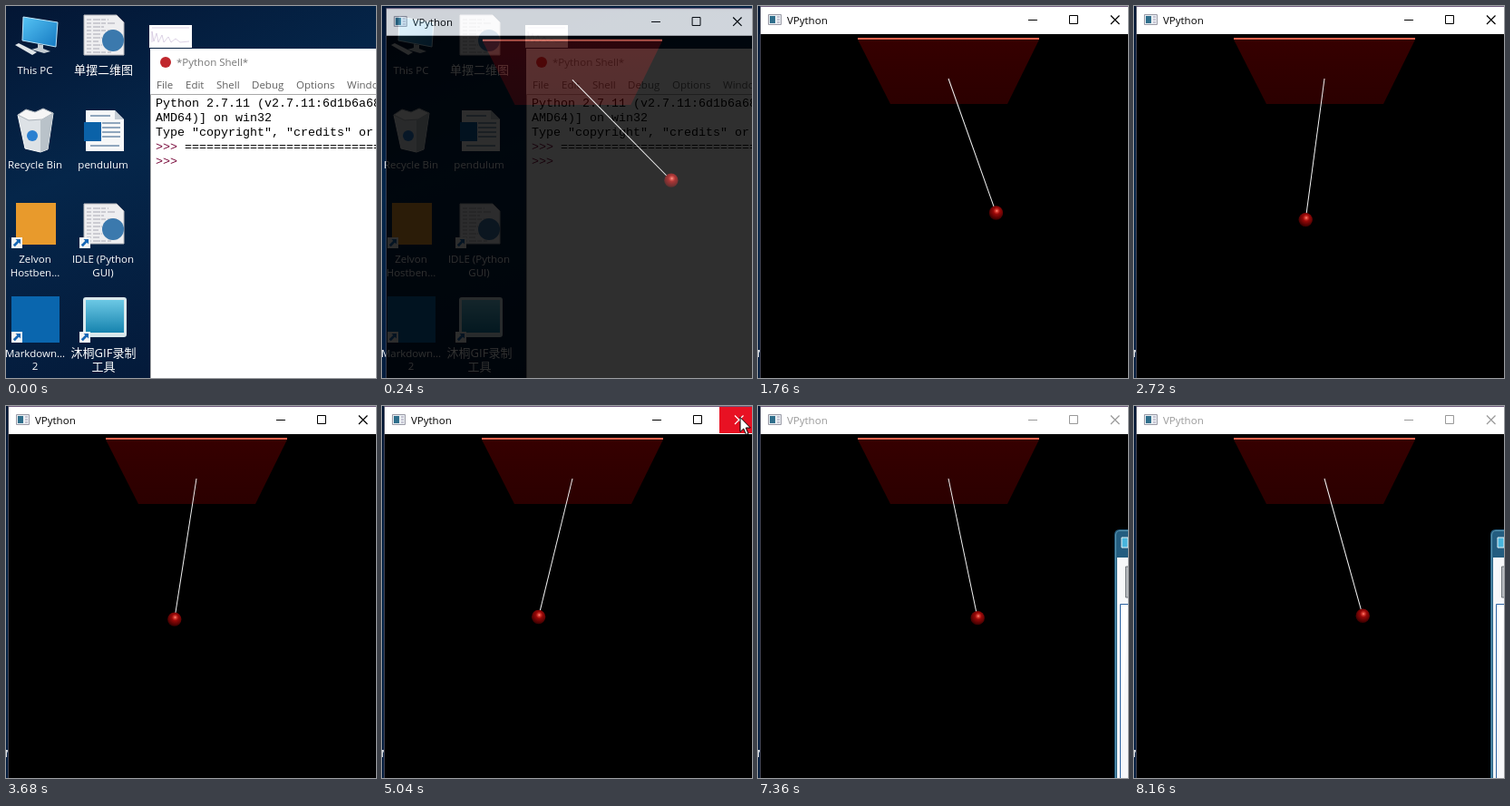
An HTML page for the animation above (8.32 s loop, 408 px wide and 410 px high).

```html
<!DOCTYPE html>
<html lang="en">
<head>
<meta charset="utf-8">
<title>Pendulum</title>
<style>
  html, body { margin: 0; width: 100%; height: 100%; overflow: hidden; background: #000; }
  svg { display: block; width: 100vw; height: 100vh; }
  text { font: 11.5px "Open Sans", "Noto Sans CJK SC", "Noto Sans CJK", sans-serif; white-space: pre; }
  .label { fill: #fff; text-anchor: middle; }
  .cjk { font-size: 13px; }
  .mono { font: 13.33px "Liberation Mono", monospace; }
  .menu { fill: #606060; }
</style>
</head>
<body>
<svg viewBox="0 0 408 410" preserveAspectRatio="none">
  <defs>
    <linearGradient id="wallpaper" x2="0.4" y2="1">
      <stop offset="0" stop-color="#031634"/>
      <stop offset=".45" stop-color="#05264a"/>
      <stop offset="1" stop-color="#041a3a"/>
    </linearGradient>
    <linearGradient id="screen" x2="1" y2="1">
      <stop offset="0" stop-color="#56c4f5"/>
      <stop offset="1" stop-color="#1478c0"/>
    </linearGradient>
    <linearGradient id="teal" x2="0" y2="1">
      <stop offset="0" stop-color="#6cc8e4"/>
      <stop offset="1" stop-color="#1683ae"/>
    </linearGradient>
    <linearGradient id="plate" x2="0" y2="1">
      <stop offset="0" stop-color="#360000"/>
      <stop offset="1" stop-color="#2b0000"/>
    </linearGradient>
    <radialGradient id="ball" cx=".55" cy=".36" r=".62">
      <stop offset="0" stop-color="#ff8c80"/>
      <stop offset=".16" stop-color="#d83a30"/>
      <stop offset=".38" stop-color="#980808"/>
      <stop offset="1" stop-color="#3c0000"/>
    </radialGradient>
    <g id="script">
      <path d="M0 0H36L44 8V44H0Z" fill="#eeeef0" stroke="#b8b8bc"/>
      <path d="M3 5H27M3 9H34M3 13H22M3 17H36M3 21H18M3 25H20M3 29H16M3 33H20M3 37H17M3 41H30"
            stroke="#a9a9b4" stroke-dasharray="5 2 8 1"/>
      <circle cx="32" cy="28" r="12" fill="#3b79ad"/>
    </g>
    <g id="shortcut">
      <path d="M0 0H12V12H0Z" fill="#f4f4f4"/>
      <path d="M4.500 2H10V7.500L8.200 5.700 3.800 10.200 1.800 8.200 6.300 3.800Z" fill="#1766b5"/>
    </g>
  </defs>

  <g id="desktop">
    <path d="M0 0H408V410H0Z" fill="url(#wallpaper)"/>

    <path d="M19 12 57 18 55 45 18 38Z" fill="url(#screen)" stroke="#bfe4f7"/>
    <path d="M35 42 41 43 41 47 49 50 42 52 28 48 35 46Z" fill="#c4ccd2"/>
    <path d="M10 43 14 41 34 51 29 54Z" fill="#dfe5e8"/>
    <use href="#script" x="86" y="10"/>

    <path d="M13 120 52 118 46 158 38 161 21 157Z" fill="#dde2e6" stroke="#f7f9fa"/>
    <path d="M13 120 22 114 32 117 41 113 52 118 40 125 25 126Z" fill="#f6f6f6" stroke="#aab2b9"/>
    <path d="M38 126 52 118 46 158 38 161Z" fill="#b9c2c9"/>
    <circle cx="29" cy="143" r="6" fill="#2a7fd0"/>
    <path d="M88 115H120L130 125V160H88Z" fill="#f6f7f8"/>
    <path d="M120 115V125H130Z" fill="#c4ccd4"/>
    <path d="M93 121H115M106 129H126M106 134H126M106 139H126M106 144H126M93 154H125"
          stroke="#8fa6bd" stroke-width="2"/>
    <path d="M86 128H105V149H86Z" fill="#0b62a8"/>

    <path d="M11 217H55V263H11Z" fill="#e89a2c"/>
    <use href="#script" x="86" y="218"/>
    <path d="M6 320H59V371H6Z" fill="#0a66ae"/>
    <rect x="85" y="321" width="48" height="44" rx="3" fill="#d9e8ec"/>
    <path d="M88 324H130V360H88Z" fill="url(#teal)"/>

    <use href="#shortcut" x="6" y="255"/>
    <use href="#shortcut" x="81" y="255"/>
    <use href="#shortcut" x="6" y="359"/>
    <use href="#shortcut" x="81" y="359"/>

    <g class="label">
      <text x="32" y="75">This PC</text>
      <text class="cjk" x="107.500" y="75">单摆二维图</text>
      <text x="32" y="179">Recycle Bin</text>
      <text x="107" y="179">pendulum</text>
      <text x="32" y="283">Zelvon</text>
      <text x="32" y="298">Hostben...</text>
      <text x="107" y="283">IDLE (Python</text>
      <text x="107" y="298">GUI)</text>
      <text x="32" y="387">Markdown...</text>
      <text x="32" y="401">2</text>
      <text class="cjk" x="107.500" y="387">沐桐GIF录制</text>
      <text class="cjk" x="107.500" y="402">工具</text>
    </g>

    <path d="M158 21H205V46H158Z" fill="#fff"/>
    <path d="M161 40V28L163 39 166 30 168 40 172 32 174 40 179 34 182 40 187 36 192 40 202 39M161 24H202"
          fill="none" stroke="#cdbfda" stroke-width=".7"/>

    <path d="M159 47H408V410H159Z" fill="#fff"/>
    <path d="M159.500 410V97.500H408" fill="none" stroke="#a8a8a8"/>
    <circle cx="176" cy="62" r="6" fill="#c0272d"/>
    <text x="188" y="66" fill="#777">*Python Shell*</text>
    <g class="menu">
      <text x="166" y="91">File</text>
      <text x="198" y="91">Edit</text>
      <text x="232" y="91">Shell</text>
      <text x="271" y="91">Debug</text>
      <text x="320" y="91">Options</text>
      <text x="376" y="91">Windows</text>
    </g>
    <text class="mono" x="165" y="111">Python 2.7.11 (v2.7.11:6d1b6a68f775</text>
    <text class="mono" x="165" y="127">AMD64)] on win32</text>
    <text class="mono" x="165" y="143">Type "copyright", "credits" or</text>
    <text class="mono" x="165" y="159" fill="#7a0c3c">&gt;&gt;&gt;</text>
    <text class="mono" x="197" y="159">==============================</text>
    <text class="mono" x="165" y="175" fill="#7a0c3c">&gt;&gt;&gt;</text>
  </g>

  <g id="window">
    <path d="M3 0H414V416H3Z"/>
    <path d="M2.500 0V416" stroke="#44485a"/>
    <path d="M3 0H414V31H3Z" fill="#fff"/>
    <path d="M3 .5H414" stroke="#6d5a7c"/>
    <path d="M11.500 9.500H25.500V20.500H11.500Z" fill="#e9eef2" stroke="#9a9aa6"/>
    <path d="M13 11H19V19H13Z" fill="#2f6f8c"/>
    <path d="M21 12H24M21 15H24M21 18H24" stroke="#a59bb4"/>
    <text id="caption" x="32" y="20">VPython</text>
    <path id="hover" d="M372 1H414V30H372Z" fill="#e81123"/>
    <g id="buttons" fill="none">
      <path d="M298 15.500H308M343.500 10.500H352.500V19.500H343.500Z"/>
      <path id="cross" d="M389 10.500 398.500 20M398.500 10.500 389 20" stroke-width="1.200"/>
    </g>
    <path d="M110 37H310L275 108H146Z" fill="url(#plate)"/>
    <path d="M110 36H310" stroke="#e0604c" stroke-width="2"/>
    <path id="rod" d="M210 80V230" stroke="#f4f4f4"/>
    <circle id="bob" r="7.700" fill="url(#ball)"/>
  </g>

  <g id="recorder">
    <path d="M393 410V142Q393 136 399 136H408V410Z" fill="#245d80"/>
    <path d="M394.500 410V142Q395 137.500 399 137.500H408" fill="none" stroke="#5792ad"/>
    <path d="M396 167H408V410H396Z" fill="#f7f8fa"/>
    <path d="M401 145H408V156H401Z" fill="#48b4dc" stroke="#e8f4f8"/>
    <path d="M408 177H405.500V211H408" fill="#b8bcc0" stroke="#70767c"/>
    <path d="M408 218.500H399.500V410" fill="#fff" stroke="#2d62a0"/>
  </g>

  <path id="cursor" d="M0 0V16L3.700 12.500 6.500 19 9 18 6.200 11.500H11.300Z" fill="#fff" stroke="#000"/>
</svg>

<script>
const LOOP = 8320, STEP = 80;
const HOLDS = [1920, 2240, 2800, 3200, 4400, 5120, 5520, 8000, 8240];
// time in ms, swing phase in degrees
const PHASES = [[240, 0], [1760, 2857.5], [3680, 6005], [5040, 8509], [6560, 11071], [8160, 14082]];
const PIVOT = { x: 210, y: 80 }, LENGTH = 157;

const $ = id => document.getElementById(id);
const set = (id, attrs) => {
  for (const name in attrs) $(id).setAttribute(name, attrs[name]);
};
const ramp = (t, from, to) => Math.min(1, Math.max(0, (t - from) / (to - from)));
const tick = t => t / STEP - HOLDS.filter(hold => hold <= t).length;

function phase(t) {
  let i = 0;
  while (i < PHASES.length - 2 && t > PHASES[i + 1][0]) i++;
  const [t0, p0] = PHASES[i], [t1, p1] = PHASES[i + 1];
  return p0 + (p1 - p0) * ramp(tick(t), tick(t0), tick(t1));
}

function swing(t) {
  const amplitude = 21 + 23.5 * Math.exp(-Math.max(0, t - 240) / 300);
  return amplitude * Math.cos(phase(t) * Math.PI / 180);
}

function draw(t) {
  const scale = 0.99 + 0.01 * ramp(t, 240, 400);
  set('window', {
    opacity: ramp(t, 0, 240) * 0.81 + ramp(t, 240, 400) * 0.19,
    transform: `translate(205 215) scale(${scale}) translate(-205 -215)`
  });

  const angle = swing(t), rad = angle * Math.PI / 180;
  set('rod', { transform: `rotate(${-angle} ${PIVOT.x} ${PIVOT.y})` });
  set('bob', { cx: PIVOT.x + LENGTH * Math.sin(rad), cy: PIVOT.y + LENGTH * Math.cos(rad) });

  const away = 1 - ramp(t, 4400, 4880) + ramp(t, 6000, 6400);
  set('cursor', {
    transform: `translate(${395 + 25 * away} ${12.5 + 50 * away})`,
    opacity: away < 1 ? 1 : 0
  });

  const hover = ramp(t, 4640, 4800) * (1 - ramp(t, 6370, 6600));
  const ink = t < 7200 ? '#000' : '#999';
  set('hover', { opacity: hover });
  set('caption', { fill: ink });
  set('buttons', { stroke: ink });
  set('cross', { stroke: hover > 0.5 ? '#fff' : ink });
  set('recorder', { opacity: ramp(t, 7120, 7360) });
}

const start = performance.now();
function frame() {
  const t = (performance.now() - start) % LOOP;
  draw(Math.floor(t / STEP) * STEP);
  requestAnimationFrame(frame);
}
frame();
</script>
</body>
</html>
```
